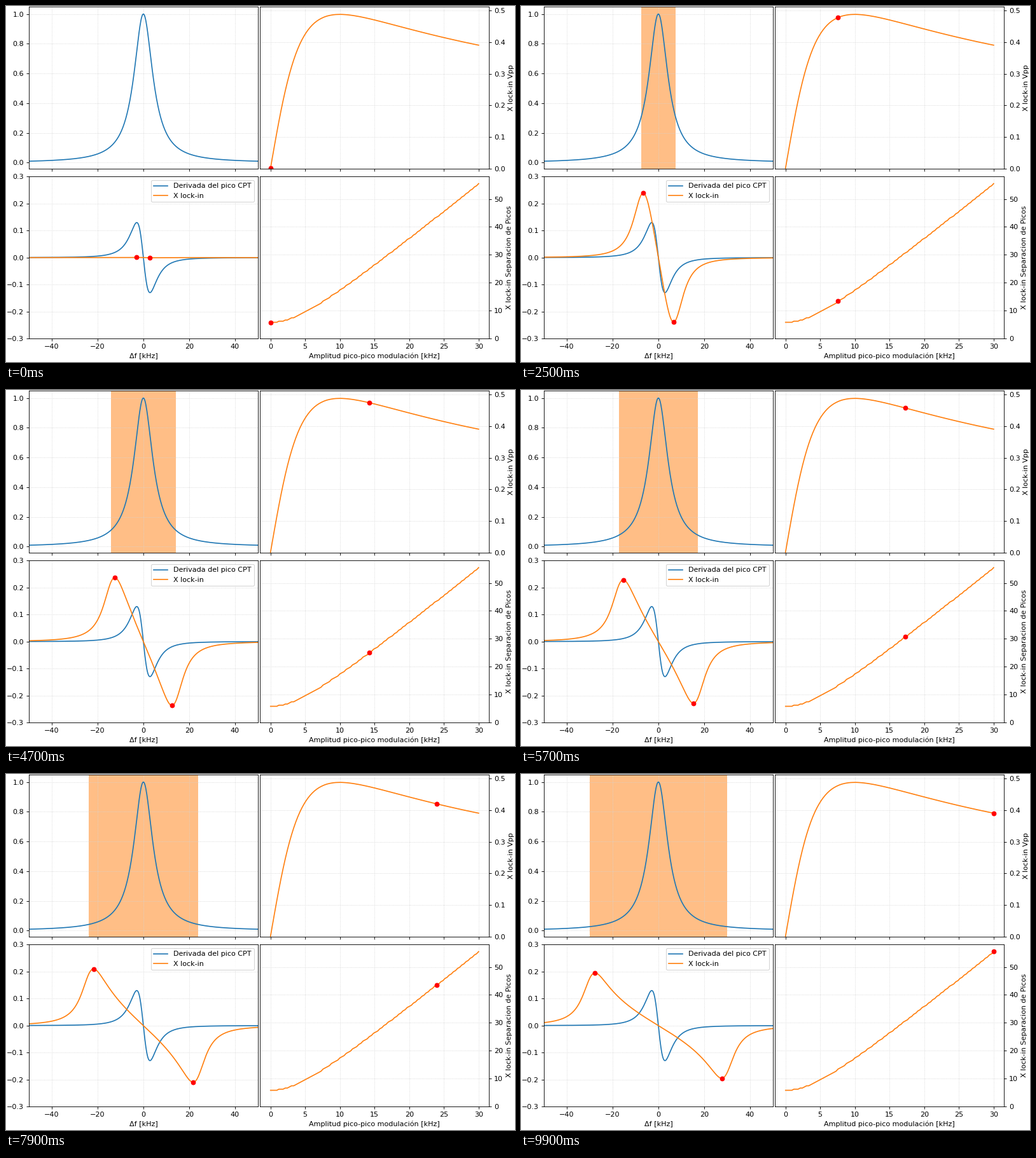
Write a matplotlib script that moves like this. It is 800x560 px and loops after 10000 ms.

```python
import numpy as np
import matplotlib.pyplot as plt
from matplotlib.animation import FuncAnimation

FRAMES, INTERVAL = 100, 100
GAMMA = 5.0   # half width of the peak, kHz
GAIN = 0.976

freq = np.linspace(-50, 50, 500)
amps = np.linspace(0.01, 30, FRAMES)


def lorentz(f):
    return 1 / (1 + (f / GAMMA) ** 2)


def slope(f):
    return -2 * f / GAMMA**2 * lorentz(f) ** 2


def lock_in(f, amp):
    """First harmonic of the peak under sine modulation, in closed form."""
    m = amp / GAMMA
    a = 1 + 1j * f / GAMMA
    return -GAIN / m * np.imag(a / np.sqrt(a**2 + m**2))


signals = np.array([lock_in(freq, amp) for amp in amps])
hi, lo = signals.argmax(axis=1), signals.argmin(axis=1)
vpp = signals.max(axis=1) - signals.min(axis=1)
gap = np.abs(freq[lo] - freq[hi])

fig, axes = plt.subplots(2, 2, figsize=(10, 7), dpi=80, sharex="col")
fig.subplots_adjust(left=0.045, right=0.949, bottom=0.066, top=0.998,
                    wspace=0.01, hspace=0.05)
(ax_peak, ax_vpp), (ax_sig, ax_gap) = axes

for ax in axes.flat:
    ax.grid(color="lightgray", linestyle=":")

ax_peak.plot(freq, lorentz(freq), color="C0")
span = ax_peak.axvspan(-amps[0], amps[0], facecolor="C1", alpha=0.5, lw=0)
ax_peak.set_xlim(-50, 50)

ax_sig.plot(freq, slope(freq), color="C0", label="Derivada del pico CPT")
sig_line, = ax_sig.plot(freq, signals[0], color="C1", label="X lock-in")
ax_sig.set_ylim(-0.3, 0.3)
ax_sig.set_xlabel("Δf [kHz]")
ax_sig.legend(loc="upper right")

for ax, data, label in ((ax_vpp, vpp, "X lock-in Vpp"),
                        (ax_gap, gap, "X lock-in Separacion de Picos")):
    ax.plot(amps, data, color="C1")
    ax.set_ylim(bottom=0)
    ax.yaxis.tick_right()
    ax.yaxis.set_label_position("right")
    ax.set_ylabel(label)
ax_gap.set_xlabel("Amplitud pico-pico modulación [kHz]")


def dot(ax):
    return ax.plot([], [], "o", color="red")[0]


sig_dots, vpp_dot, gap_dot = dot(ax_sig), dot(ax_vpp), dot(ax_gap)


def update(i):
    amp, ends = amps[i], [hi[i], lo[i]]
    span.set_x(-amp)
    span.set_width(2 * amp)
    sig_line.set_ydata(signals[i])
    sig_dots.set_data(freq[ends], signals[i][ends])
    vpp_dot.set_data([amp], [vpp[i]])
    gap_dot.set_data([amp], [gap[i]])
    return span, sig_line, sig_dots, vpp_dot, gap_dot


anim = FuncAnimation(fig, update, frames=FRAMES, interval=INTERVAL,
                     repeat=True, repeat_delay=0)
plt.show()
```
